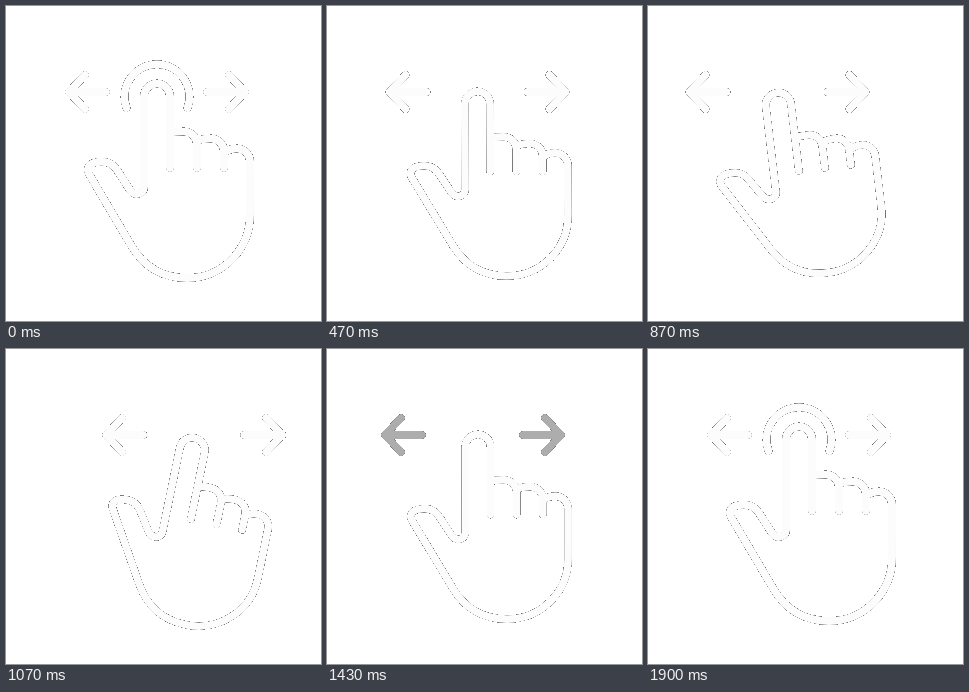
Animation, 315 px wide and 315 px high, one loop 2.01 s. Source, as an HTML page with a canvas:

```html
<!DOCTYPE html>
<html>
<head>
<meta charset="utf-8">
<style>
html, body { margin: 0; width: 100%; height: 100%; overflow: hidden; background: #fff; }
canvas { display: block; }
</style>
</head>
<body>
<canvas id="stage" width="315" height="315"></canvas>
<script>
const LOOP = 2010, SIZE = 315;
const ctx = document.getElementById('stage').getContext('2d', { willReadFrequently: true });

const hand = new Path2D(
  'M164 162V90.5A13 13 0 0 0 138 90.5V181C138 188 129 191 124 184L113 167' +
  'C109 160 104 154.5 92 156C83 157 80 162 83 168L125.5 240C138 261 156 272 181 272' +
  'A63 63 0 0 0 244 208V155.5A13 13 0 0 0 231 142.5C226 142.5 222 143.5 218 147' +
  'M164 126.5C168 125.7 173 125.5 178 125.5A13 13 0 0 1 191 138.5V162' +
  'M191 135C195 133.2 200 132.5 205 132.5A13 13 0 0 1 218 145.5V162');
const arrows = new Path2D(
  'M79 69L63 86L79 103M63 86H100M223 69L239 86L223 103M239 86H201');
const ring = new Path2D('M120.5 102A32.5 32.5 0 1 1 181.5 102');

function fade(t, a, b) {
  return Math.min(1, Math.max(0, (t - a) / (b - a)));
}

// Eased progress from 0 to 1 between times a and b
function ramp(t, a, b) {
  return (1 - Math.cos(Math.PI * fade(t, a, b))) / 2;
}

function stroke(path, alpha) {
  ctx.globalAlpha = alpha;
  ctx.stroke(path);
}

// One-bit transparency over white, with soft pixels blended to black
function flatten() {
  const img = ctx.getImageData(0, 0, SIZE, SIZE), d = img.data;
  for (let i = 0; i < d.length; i += 4) {
    const a = d[i + 3];
    d[i] = d[i + 1] = d[i + 2] = a < 110 ? 255 : Math.round(a * 252 / 255);
    d[i + 3] = 255;
  }
  ctx.putImageData(img, 0, 0);
}

function draw(t) {
  const home = ramp(t, 1122, 1425);
  const swing = -38 * ramp(t, 450, 762) + 79 * ramp(t, 762, 1122) - 41 * home;
  const press = ramp(t, 50, 320) - ramp(t, 1440, 1625);
  const back = fade(t, 1640, 1880);
  const ending = t >= 1630;

  ctx.clearRect(0, 0, SIZE, SIZE);
  ctx.strokeStyle = '#fff';
  ctx.lineWidth = 8;
  ctx.lineCap = ctx.lineJoin = 'round';

  ctx.save();
  ctx.translate(152, 272);
  ctx.rotate(swing * 0.315 * Math.PI / 180);
  ctx.translate(-152, -272);
  ctx.transform(1 - 0.03 * press, 0, 0, 1 - 0.05 * press, 4.4 * press, 11.7 * press);
  stroke(hand, 1);
  ctx.restore();

  ctx.save();
  ctx.translate(ending ? 0 : swing - 5 * home, 0);
  stroke(arrows, ending ? back : 1 - fade(t, 1390, 1520));
  ctx.restore();

  stroke(ring, ending ? back : 1 - fade(t, 40, 300));
  flatten();
}

const start = performance.now();
function tick() {
  draw((performance.now() - start) % LOOP);
  requestAnimationFrame(tick);
}
tick();
</script>
</body>
</html>
```
